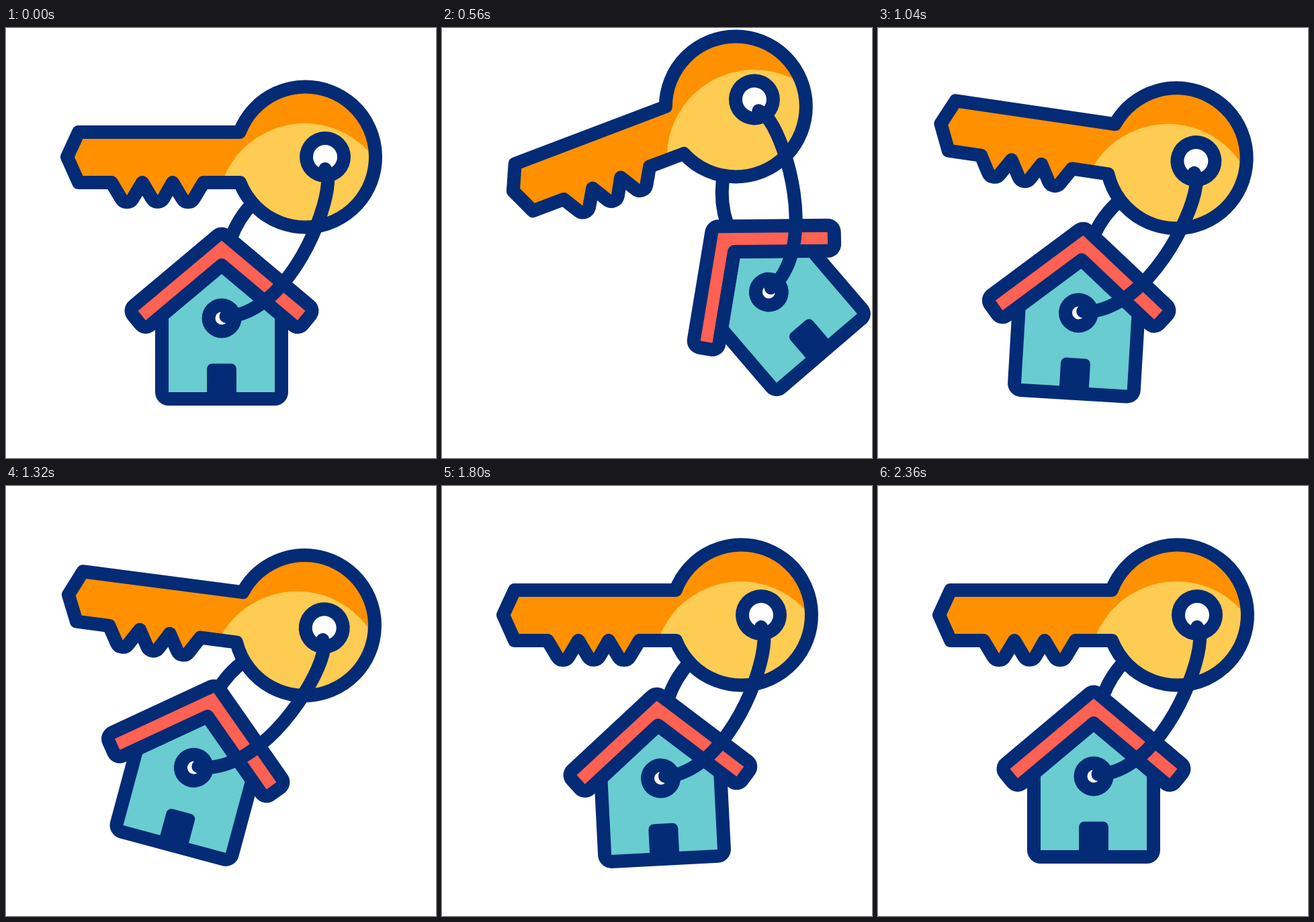
These frames come from a looping animation (640x640 px, 2640 ms). An HTML page with a canvas:

```html
<!DOCTYPE html>
<html lang="en">
<head>
<meta charset="utf-8">
<title>House key</title>
<style>
  html, body { margin: 0; height: 100%; overflow: hidden; background: #fff; }
  canvas { display: block; width: 100vmin; height: 100vmin; }
</style>
</head>
<body>
<canvas id="stage"></canvas>
<script>
const SIZE = 640, LOOP = 2640;
const NAVY = '#042b76', ORANGE = '#ff9100', YELLOW = '#fecc52';
const TEAL = '#68ccd1', RED = '#ff6153', WHITE = '#fff';

const canvas = document.getElementById('stage');
const ctx = canvas.getContext('2d');

// Each track is a list of [time, value]; rotations are in degrees.
const lift = [[90, 0], [680, -34.2], [1380, 0]];
const keyTurn = [[40, 0], [500, -21.6], [1125, 9.9], [1720, 0]];
const ropeTurn = [[264, 0], [650, -19.9], [1260, 3.5], [1640, -1.96], [2280, 0]];
const houseTurn = [[420, 0], [820, -9.4], [1240, 5.4], [1640, -3], [2280, 0]];

const smooth = u => u * u * (3 - 2 * u);
const settle = u => 1 - (1 - u ** 1.5) ** 4;

function valueAt(track, t) {
  if (t <= track[0][0]) return track[0][1];
  for (let i = 1; i < track.length; i++) {
    const [t0, a] = track[i - 1], [t1, b] = track[i];
    if (t < t1) {
      const ease = t1 === 2280 ? settle : smooth;
      return a + (b - a) * ease((t - t0) / (t1 - t0));
    }
  }
  return track[track.length - 1][1];
}

function polygon(...pts) {
  const path = new Path2D();
  pts.forEach(([x, y]) => path.lineTo(x, y));
  path.closePath();
  return path;
}

function buildKey() {
  const path = new Path2D(), r = 104.5;
  path.moveTo(91, 192);
  path.lineTo(108, 155);
  path.arc(445.5, 192, r, Math.PI + Math.asin(37 / r), Math.PI - Math.asin(38 / r));
  path.lineTo(294, 230);
  for (const x of [271, 226, 180]) {
    path.arcTo(x, 268.5, x - 23, 230, 10);
    path.lineTo(x - 23, 230);
  }
  path.lineTo(108, 230);
  path.closePath();
  return path;
}

function buildRoof() {
  const path = new Path2D();
  path.moveTo(321, 316.5);
  path.lineTo(445.5, 421);
  path.lineTo(434, 435);
  path.arcTo(321, 340, 208, 435, 10);
  path.lineTo(208, 435);
  path.lineTo(196.5, 421);
  path.closePath();
  return path;
}

const keyShape = buildKey();
const roof = buildRoof();
const walls = polygon([242, 542], [400, 542], [400, 432], [321, 366], [242, 432]);
const ropeBack = new Path2D('M392 237L368 260Q345.5 283 334.8 313L322 348');
const ropeFront = new Path2D('M475 210Q480 220 479 230C476 280 425 405 345 427L327.5 429');

function fill(path, color) {
  ctx.fillStyle = color;
  ctx.fill(path);
}

function stroke(path, width) {
  ctx.strokeStyle = NAVY;
  ctx.lineWidth = width;
  ctx.stroke(path);
}

function disc(x, y, r, color) {
  ctx.beginPath();
  ctx.arc(x, y, r, 0, 2 * Math.PI);
  ctx.fillStyle = color;
  ctx.fill();
}

function spin(x, y, degrees) {
  ctx.translate(x, y);
  ctx.rotate(degrees * Math.PI / 180);
  ctx.translate(-x, -y);
}

function layer(draw, ...turns) {
  ctx.save();
  turns.forEach(turn => spin(...turn));
  draw();
  ctx.restore();
}

function drawKey() {
  fill(keyShape, ORANGE);
  ctx.save();
  ctx.clip(keyShape);
  disc(444.5, 272, 130, YELLOW);
  ctx.restore();
  stroke(keyShape, 20);
  disc(475, 192, 38, NAVY);
  disc(475, 192, 18, WHITE);
}

function drawHouse() {
  stroke(walls, 40);
  fill(walls, TEAL);
  ctx.beginPath();
  ctx.roundRect(299, 499.5, 44, 52, [8, 8, 0, 0]);
  ctx.fillStyle = NAVY;
  ctx.fill();
  stroke(roof, 40);
  fill(roof, RED);
  disc(321, 432, 29.5, NAVY);
  disc(321, 432, 9.5, WHITE);
}

function render(t) {
  const scale = canvas.width / SIZE;
  ctx.setTransform(scale, 0, 0, scale, 0, 0);
  ctx.fillStyle = WHITE;
  ctx.fillRect(0, 0, SIZE, SIZE);
  ctx.lineJoin = ctx.lineCap = 'round';

  // The rope hangs from the key and the house hangs from the rope.
  ctx.translate(0, valueAt(lift, t));
  spin(320, 192, valueAt(keyTurn, t));
  const rope = [475, 210, valueAt(ropeTurn, t)];
  const house = [321, 432, valueAt(houseTurn, t)];
  layer(() => stroke(ropeBack, 20), rope);
  drawKey();
  layer(drawHouse, rope, house);
  layer(() => stroke(ropeFront, 20), rope);
}

function resize() {
  const side = Math.min(innerWidth, innerHeight) || SIZE;
  canvas.width = canvas.height = Math.round(side * (devicePixelRatio || 1));
}

let start;
function tick(now) {
  start ??= now;
  render((now - start) % LOOP);
  requestAnimationFrame(tick);
}

addEventListener('resize', resize);
resize();
render(0);
requestAnimationFrame(tick);
</script>
</body>
</html>
```
